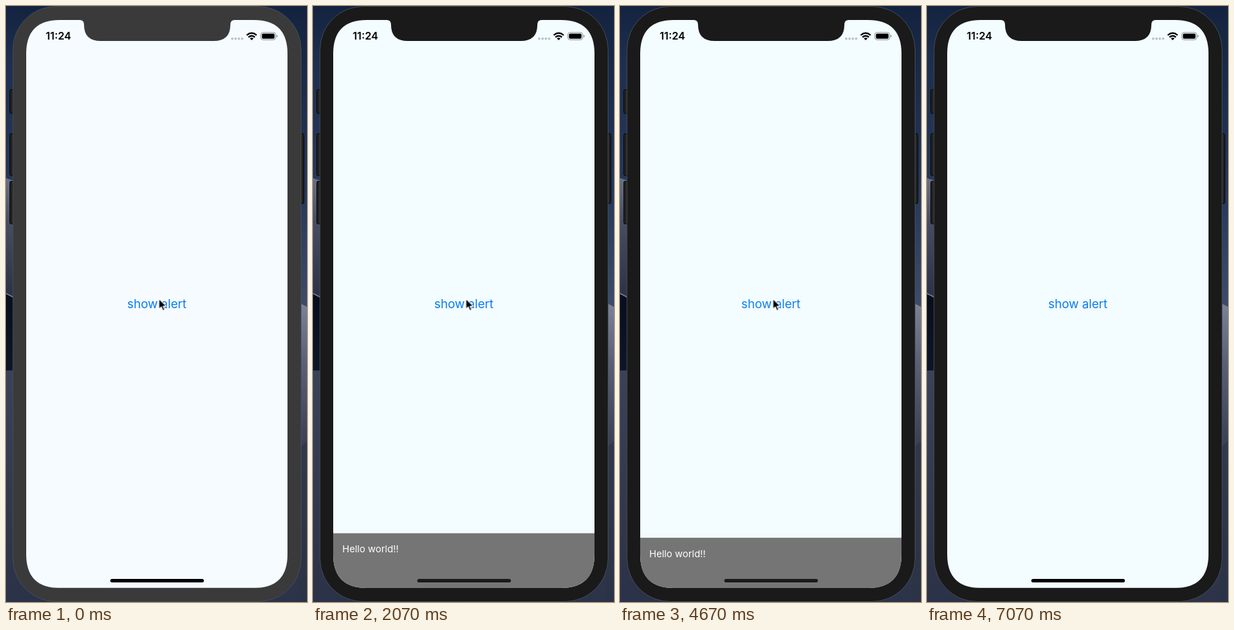
Write an HTML page that moves like this. It is 432 px wide and 852 px high and loops after 7140 ms.

```html
<!DOCTYPE html>
<html lang="en">
<head>
<meta charset="utf-8">
<title>Show alert</title>
<style>
  html, body { margin: 0; width: 100%; height: 100%; overflow: hidden; background: #1b2740; }
  svg { display: block; width: 432px; height: 852px; }
  text { font-family: Inter, "Open Sans", sans-serif; }

  .anim { animation: 7140ms linear infinite; }
  .bezel { animation-name: bezel; }
  .screen { animation-name: screen; }
  .link { animation-name: press; }
  .panel { animation-name: slide; }
  .home { animation-name: home; }
  .cursor { animation-name: leave; }

  /* window gains focus on the first click */
  @keyframes bezel {
    0% { fill: #3a3a3a; animation-timing-function: step-end; }
    19.482%, 100% { fill: #1a1a1a; }
  }
  @keyframes screen {
    0% { fill: #f5fbff; animation-timing-function: step-end; }
    19.482%, 100% { fill: #f3fcff; }
  }
  @keyframes press {
    0% { opacity: 1; animation-timing-function: step-end; }
    19.482% { opacity: .2; animation-timing-function: cubic-bezier(.45, 0, .55, 1); }
    22.983% { opacity: 1; animation-timing-function: step-end; }
    61.555% { opacity: .2; }
    62.325% { opacity: .2; animation-timing-function: cubic-bezier(.45, 0, .55, 1); }
    65.826%, 100% { opacity: 1; }
  }
  @keyframes slide {
    0% { transform: translateY(0); }
    19.762% { transform: translateY(0); animation-timing-function: ease; }
    23.964% { transform: translateY(-78px); }
    50.98% { transform: translateY(-78px); animation-timing-function: ease; }
    55.182% { transform: translateY(0); }
    62.619% { transform: translateY(0); animation-timing-function: ease; }
    66.821% { transform: translateY(-78px); }
    93.838% { transform: translateY(-78px); animation-timing-function: ease; }
    98.039%, 100% { transform: translateY(0); }
  }
  @keyframes home {
    0%, 19.9% { fill: #000; }
    21%, 53% { fill: #1a1a1a; }
    54.5%, 62.8% { fill: #000; }
    63.8%, 95.8% { fill: #1a1a1a; }
    97.3%, 100% { fill: #000; }
  }
  @keyframes leave {
    0% { transform: translate(219.5px, 418.5px); visibility: visible; }
    83.333% { transform: translate(219.5px, 418.5px); animation-timing-function: cubic-bezier(.5, 0, .9, .6); }
    87.815% { transform: translate(232px, 260px); visibility: visible; animation-timing-function: step-end; }
    88.235%, 100% { transform: translate(232px, 260px); visibility: hidden; }
  }
</style>
</head>
<body>
<svg viewBox="0 0 432 852" xmlns="http://www.w3.org/2000/svg">
  <defs>
    <linearGradient id="sky" x2="0" y2="1">
      <stop stop-color="#13233f"/><stop offset=".3" stop-color="#1d2f50"/><stop offset="1" stop-color="#26385a"/>
    </linearGradient>
    <linearGradient id="dune" x2="0" y2="1">
      <stop stop-color="#6a7084"/><stop offset=".35" stop-color="#474e64"/><stop offset="1" stop-color="#2a3146"/>
    </linearGradient>
    <linearGradient id="shade" x2="0" y2="1">
      <stop stop-color="#070e1d"/><stop offset="1" stop-color="#0d1628"/>
    </linearGradient>
    <linearGradient id="sand" x2="0" y2="1">
      <stop stop-color="#3a4259"/><stop offset="1" stop-color="#2b3247"/>
    </linearGradient>
    <linearGradient id="east" x2="0" y2="1">
      <stop stop-color="#13233f"/><stop offset=".3" stop-color="#24375a"/><stop offset=".5" stop-color="#3c4b6b"/>
    </linearGradient>
    <linearGradient id="ridge" x2="0" y2="1">
      <stop stop-color="#7c8398"/><stop offset=".2" stop-color="#596077"/>
      <stop offset=".45" stop-color="#3c4359"/><stop offset="1" stop-color="#2c3348"/>
    </linearGradient>
    <clipPath id="glass">
      <path id="face" d="M77 20H106Q112 20 112 27Q112 50 136 50H298Q322 50 322 27Q322 20 328 20H356C388 20 404 36 404 68V784C404 816 388 832 356 832H77C45 832 29 816 29 784V68C29 36 45 20 77 20Z"/>
    </clipPath>
  </defs>

  <!-- wallpaper -->
  <rect width="216" height="260" fill="url(#sky)"/>
  <path d="M0 246L12 250V420H0Z" fill="url(#dune)"/>
  <path d="M0 411L12 418V522H0Z" fill="url(#shade)"/>
  <path d="M0 411L12 417" stroke="#79809a" stroke-width="1.5"/>
  <rect y="521" width="216" height="331" fill="url(#sand)"/>
  <rect x="216" width="216" height="852" fill="url(#east)"/>
  <path d="M216 424H420L432 430V852H216Z" fill="url(#ridge)"/>
  <path d="M420 632L432 622V852H420Z" fill="#2b3247" opacity=".6"/>

  <!-- side buttons -->
  <g fill="#222" stroke="#060606">
    <rect x="5.5" y="119.5" width="10" height="34" rx="2"/>
    <rect x="5.5" y="182.5" width="10" height="60" rx="2"/>
    <rect x="5.5" y="250.5" width="10" height="61" rx="2"/>
    <rect x="417.500" y="182.5" width="10" height="100" rx="2"/>
  </g>

  <rect class="anim bezel" x="10" y=".5" width="413.500" height="851" rx="62" stroke="#4a4e56" stroke-width=".9"/>
  <use href="#face" class="anim screen"/>

  <!-- status bar -->
  <text x="57" y="48.300" font-size="15" font-weight="600">11:24</text>
  <g fill="#b9bec1">
    <circle cx="324.700" cy="46.700" r="1.700"/><circle cx="329.500" cy="46.700" r="1.700"/>
    <circle cx="334.200" cy="46.700" r="1.700"/><circle cx="338.900" cy="46.700" r="1.700"/>
  </g>
  <g fill="none" stroke="#000" stroke-width="2.200">
    <path d="M345.500 41.800Q352.600 35.500 359.700 41.800"/>
    <path d="M348 44.600Q352.600 40.600 357.200 44.600"/>
  </g>
  <path d="M350 46.300Q352.600 44.200 355.200 46.300L352.600 49Z"/>
  <rect x="365.700" y="37.900" width="21.300" height="10.400" rx="3" fill="none" stroke="#8f9496"/>
  <rect x="367.300" y="39.500" width="18.100" height="7.200" rx="1.600"/>
  <path d="M388.300 41.300Q390 42 390 43.100T388.300 44.900Z" fill="#8f9496"/>

  <text class="anim link" x="216.500" y="432.400" font-size="17.500" letter-spacing="-.1" text-anchor="middle" fill="#087cf0">show alert</text>

  <g clip-path="url(#glass)">
    <g class="anim panel">
      <rect x="29" y="831.700" width="375" height="90" fill="#757575"/>
      <text x="42" y="859.300" font-size="13.700" fill="#fff">Hello world!!</text>
    </g>
  </g>
  <rect class="anim home" x="149.700" y="819" width="134.300" height="5" rx="2.500"/>

  <path class="anim cursor" d="M0 0V14.800L3.400 11.600L5.700 17L8.200 15.900L5.900 10.700H10.600Z" stroke="#fff" stroke-width="1.100" stroke-linejoin="round"/>
</svg>
<script>
  const loop = 7140, step = 1000 / 15;
  const anims = document.getAnimations();
  anims.forEach(a => a.pause());
  let start;
  function tick(now) {
    start ??= now;
    const t = (now - start) % loop;
    const time = Math.floor((t + 4) / step) * step;
    anims.forEach(a => { a.currentTime = time; });
    requestAnimationFrame(tick);
  }
  requestAnimationFrame(tick);
</script>
</body>
</html>
```
